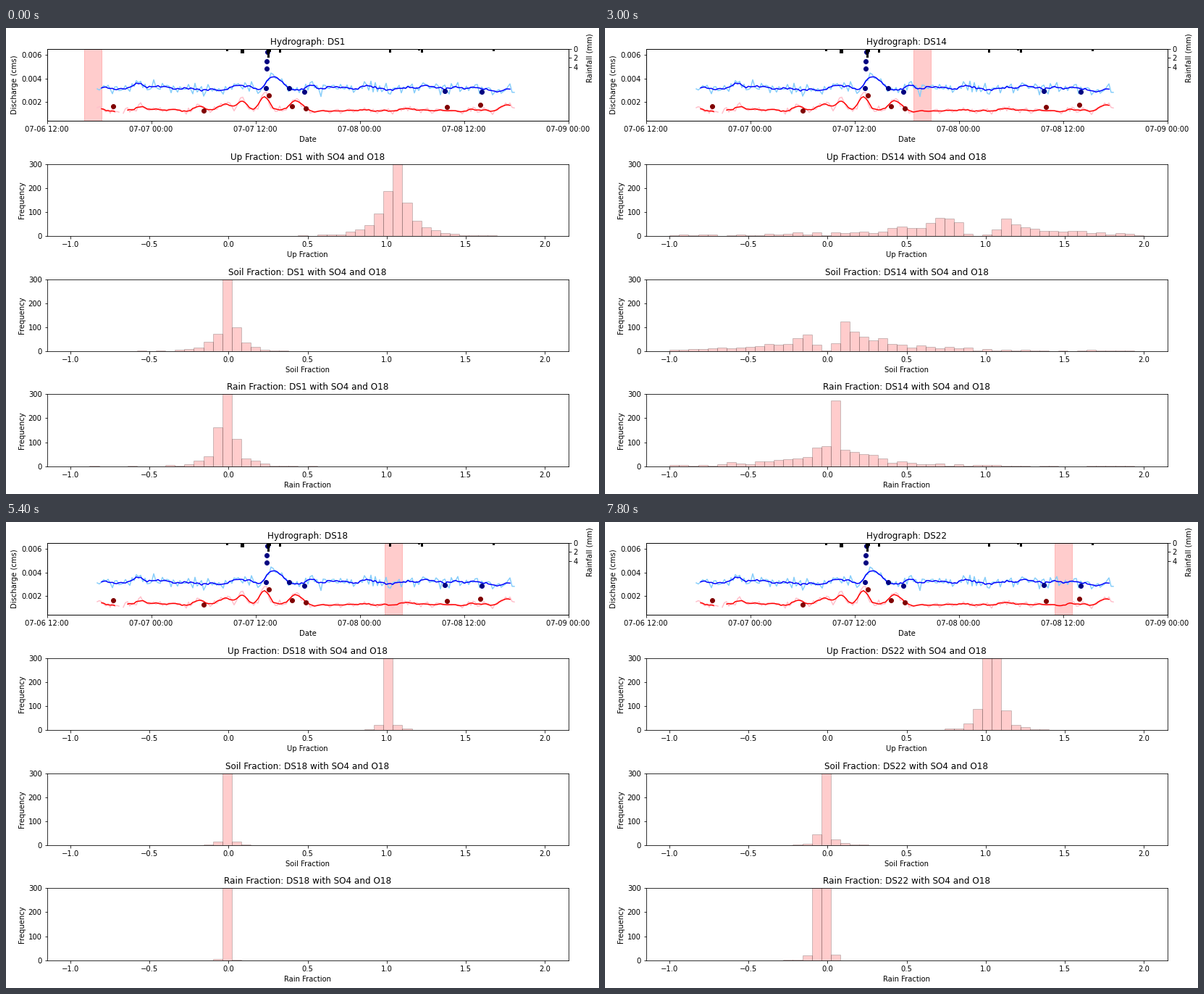
Recreate the animation shown at these times as a matplotlib script. Size 819 px wide and 643 px high, loop 8000 ms.

```python
import matplotlib.pyplot as plt
import numpy as np
from matplotlib.animation import FuncAnimation

W, H, DPI = 819, 643, 72
LEFT, RIGHT = 56.55, 776.55
AX_HEIGHT = 99.2
TOPS = 29 + 158.8 * np.arange(4)
BINS = np.arange(50)
BIN_WIDTH = 0.06
SAMPLES = 1000

SITES = [1] + list(range(10, 23))

# Key sites; the others lie between their neighbours.
# band x, share left of the gap, spread, up centre, rain centre, rain spread
KEY_SITES = {
    1: (108, 0.5, 0.8, 33.8, 15.9, 0.45),
    12: (379.3, 0.34, 3.7, 32, 16, 2.2),
    14: (425.5, 0.6, 4.5, 32, 17, 2.6),
    16: (475, 0.66, 6, 33, 17.3, 1.8),
    18: (523, 0.5, 0.2, 33, 16, 0.11),
    20: (571, 0.3, 2, 33, 15.4, 0.57),
    22: (621, 0.5, 0.35, 33.5, 15.5, 0.12),
}
SOIL_CENTRE = 16

# Bumps in the flow: centre, height, width to the left and to the right.
BLUE_BUMPS = [(182, 2, 6, 6), (324, 8, 6, 5), (364, 20, 5, 18), (455, 4, 15, 6),
              (578, 5, 10, 5), (674, -6, 5, 5)]
RED_BUMPS = [(130, 7, 5, 5), (187, 6, 6, 6), (268, 7, 8, 8), (305, 12, 6, 6),
             (326, 19, 7, 7), (357, 25, 7, 8), (400, 18, 8, 10), (562, 4, 12, 12),
             (692, 8, 9, 20)]

NAVY_DOTS = [(359, 83), (360, 56), (360, 46), (361, 33),
             (391, 83), (412, 88), (606, 87), (657, 88)]
MAROON_DOTS = [(148, 108), (273, 114), (363, 93), (395, 108),
               (414, 111), (609, 109), (655, 106)]
RAINFALL = [(305.5, .5), (325, .9), (327.5, .9), (361, 1), (362.5, 2), (364.5, .6),
            (378.5, .8), (530.5, .8), (570.5, .4), (574.5, .8), (673.5, .5)]

rng = np.random.default_rng(7)


def hours(x):
    return (np.asarray(x, float) - LEFT) / 12


def flow(y):
    return 0.002 + (102 - np.asarray(y, float)) * 6.18e-5


def histogram(centre, spread, share=0.5, max_gap=0):
    """Two long-tailed lobes; wide spreads leave a gap between them."""
    gap = min(max_gap, max(0, int(1.8 * (spread - 0.3))))
    left = centre - gap // 2
    right = left + gap
    inner = gap / 4.5 + 1e-6

    def lobe(outward):
        tail = np.exp(-(np.maximum(outward, 0) / spread) ** 0.7)
        slope = np.exp(-(np.minimum(outward, 0) / inner) ** 2)
        return tail * slope

    lobes = share * lobe(left - BINS) + (1 - share) * lobe(BINS - right)
    return rng.poisson(SAMPLES * lobes / lobes.sum())


def add_axes(top):
    return fig.add_axes([LEFT / W, 1 - (top + AX_HEIGHT) / H,
                         (RIGHT - LEFT) / W, AX_HEIGHT / H])


def plot_flow(ax, base, bumps, noise, pale, color, missing=None, window=5):
    """Noisy samples every quarter hour and their rolling mean."""
    x = np.arange(126, 703, 3)
    y = base + rng.normal(0, noise, len(x))
    for centre, height, before, after in bumps:
        width = np.where(x < centre, before, after)
        y -= height * np.exp(-((x - centre) / width) ** 2)
    if missing is not None:
        y[missing] = np.nan
    mean = np.convolve(y, np.ones(window) / window, "valid")
    edge = window // 2
    ax.plot(hours(x), flow(y), color=pale, lw=1.5)
    ax.plot(hours(x[edge:-edge]), flow(mean), color=color, lw=1.5)


def plot_dots(ax, dots, color):
    x, y = np.transpose(dots)
    ax.plot(hours(x), flow(y), "o", color=color, ms=6)


fig = plt.figure(figsize=(W / DPI, H / DPI), dpi=DPI, facecolor="white")

# Hydrograph
hydro = add_axes(TOPS[0])
band = hydro.axvspan(0, 2.02, color="red", alpha=0.2)
plot_flow(hydro, 84, BLUE_BUMPS, 5, "lightskyblue", "blue")
plot_flow(hydro, 114, RED_BUMPS, 2.4, "pink", "red", missing=11)
plot_dots(hydro, NAVY_DOTS, "navy")
plot_dots(hydro, MAROON_DOTS, "maroon")
hydro.set_xlim(0, 60)
hydro.set_ylim(flow(TOPS[0] + AX_HEIGHT), flow(TOPS[0]))
hydro.set_xticks(range(0, 61, 12),
                 ["07-06 12:00", "07-07 00:00", "07-07 12:00",
                  "07-08 00:00", "07-08 12:00", "07-09 00:00"])
hydro.set_yticks([0.002, 0.004, 0.006])
hydro.set_xlabel("Date")
hydro.set_ylabel("Discharge (cms)")
hydro_title = hydro.set_title("")

rain = hydro.twinx()
rain_x, rain_mm = np.transpose(RAINFALL)
rain.bar(hours(rain_x), rain_mm, width=0.24, color="black")
rain.set_xlim(0, 60)
rain.set_ylim(16, 0)
rain.set_yticks([0, 2, 4])
fig.text(806.5 / W, 1 - 41.5 / H, "Rainfall (mm)", rotation=90, ha="center", va="center")

# Histograms
panels = []
for top, name in zip(TOPS[1:], ["Up", "Soil", "Rain"]):
    ax = add_axes(top)
    bars = ax.bar(-1 + BIN_WIDTH * BINS, 0 * BINS, width=BIN_WIDTH, align="edge",
                  facecolor="red", edgecolor="black", linewidth=1, alpha=0.2)
    ax.set_xlim(-1.15, 2.15)
    ax.set_ylim(0, 300)
    ax.set_xticks(np.arange(-1, 2.1, 0.5))
    ax.set_yticks([0, 100, 200, 300])
    ax.set_xlabel(f"{name} Fraction")
    ax.set_ylabel("Frequency")
    panels.append((name, ax.set_title(""), bars))

columns = zip(*KEY_SITES.values())
settings = np.transpose([np.interp(SITES, list(KEY_SITES), col) for col in columns])
counts = [
    (histogram(up, spread, share, max_gap=6),
     histogram(SOIL_CENTRE, 0.75 * spread, 1 - share, max_gap=4),
     histogram(wet, wet_spread))
    for _, share, spread, up, wet, wet_spread in settings
]


def update(frame):
    step = frame // 3
    site = f"DS{SITES[step]}"
    hydro_title.set_text(f"Hydrograph: {site}")
    band.set_x(hours(settings[step, 0]))
    for (name, title, bars), heights in zip(panels, counts[step]):
        title.set_text(f"{name} Fraction: {site} with SO4 and O18")
        for bar, height in zip(bars, heights):
            bar.set_height(height)


anim = FuncAnimation(fig, update, frames=40, interval=200, repeat=True, repeat_delay=0)
plt.show()
```
